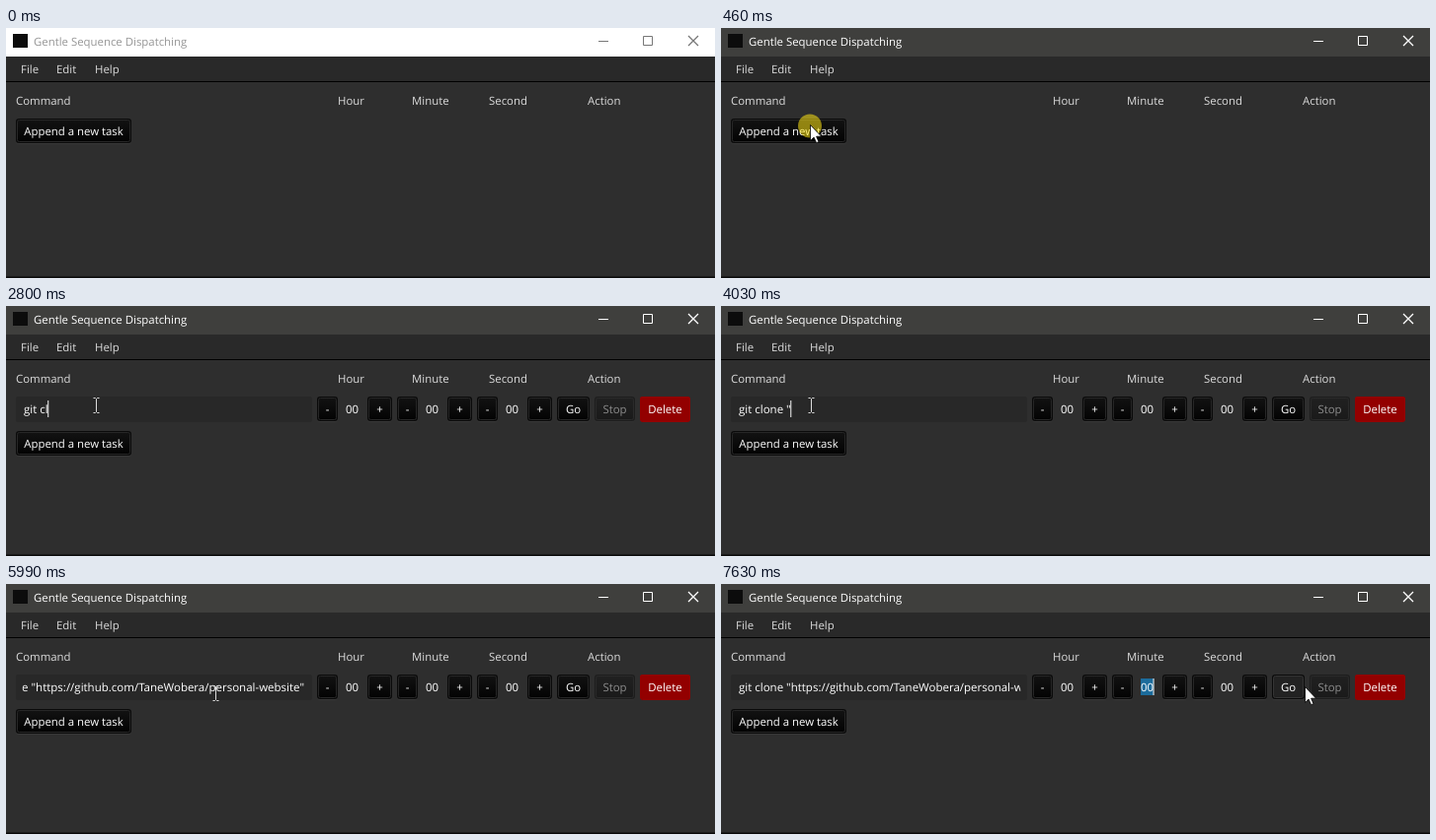
Recreate the animation shown at these times as an HTML page. Size 718 by 254 pixels, loop 8 s.

```html
<!DOCTYPE html>
<html lang="en">
<head>
<meta charset="utf-8">
<title>Gentle Sequence Dispatching</title>
<style>
html, body { margin: 0; width: 100%; height: 100%; overflow: hidden; background: #2e2e2e; }
svg { display: block; width: 718px; height: 254px; }
text {
  font: 11.4px "Open Sans", "Noto Sans", sans-serif;
  text-rendering: geometricPrecision;
  white-space: pre;
  fill: #dcdcdc;
}
.mid { text-anchor: middle; }
.btn text, .num, #cmd { fill: #fff; }
#cmd { font-size: 11.5px; }
.btn .glow { fill: #383838; }
.btn .edge { fill: #0a0a0a; }
.btn .face { fill: url(#face); stroke: #262626; }
.btn.hover .face { fill: #222; stroke: #343434; }
.btn.off { opacity: .45; }
.btn.red rect { fill: #930000; stroke: none; }
#bar { fill: #fff; }
#name { fill: #969696; }
#ctl { fill: none; stroke: #777; }
.active #bar { fill: #3f3f3d; }
.active #name { fill: #fff; }
.active #ctl { stroke: #fff; }
</style>
</head>
<body>
<svg id="app" viewBox="0 0 718 254">
  <defs>
    <linearGradient id="face" x2="0" y2="1">
      <stop stop-color="#121212"/><stop offset="1" stop-color="#030303"/>
    </linearGradient>
    <clipPath id="clip"><rect x="16.5" y="92" width="286.7" height="26"/></clipPath>
  </defs>

  <rect width="718" height="254" fill="#2e2e2e"/>
  <rect id="bar" width="718" height="29"/>
  <rect x="7" y="6" width="15" height="14" fill="#0c0c0c"/>
  <text id="name" x="28" y="18">Gentle Sequence Dispatching</text>
  <g id="ctl">
    <path d="M600 13.5h10M645.5 8.5h9v9h-9z"/>
    <path d="M691 8l10 10M701 8l-10 10" stroke-width="1.3"/>
  </g>
  <rect y="29" width="718" height="25" fill="#292929"/>
  <rect y="54" width="718" height="1" fill="#000"/>
  <rect y="252.5" width="718" height="1.5" fill="#080808"/>
  <g id="labels"></g>

  <g id="row">
    <rect x="10" y="92" width="300" height="26" rx="2" fill="#282828"/>
    <g clip-path="url(#clip)"><text id="cmd" y="109"></text></g>
    <rect id="sel" x="425" y="96" width="13" height="17" fill="#1c6c9c"/>
  </g>
  <g id="append"></g>
  <rect id="caret" y="96" width="1.1" height="17" fill="#e4e4e4"/>

  <circle id="press" r="12" fill="#ffe614" fill-opacity=".55"/>
  <g id="pointer">
    <path id="arrow" d="M.5 .5V16.5L4.1 13.1 6.6 18.7 9 17.7 6.6 12.2H11.6Z" fill="#fff" stroke="#000" stroke-width=".8"/>
    <path id="beam" d="M-2.5-7.5H-.5L.5-6.5 1.5-7.5H3.5M.5-6.5V6.5M-2.5 7.5H-.5L.5 6.5 1.5 7.5H3.5" fill="none" stroke="#dcdcdc"/>
  </g>
</svg>
<script>
const LOOP = 8000;
const ACTIVATE = 460, ADD_ROW = 540, LEAVE_FIELD = 6780, DRAG = 7250, SELECT = 7330;
const $ = id => document.getElementById(id);

function el(parent, tag, attrs, text) {
  const node = document.createElementNS('http://www.w3.org/2000/svg', tag);
  for (const key in attrs) node.setAttribute(key, attrs[key]);
  if (text) node.textContent = text;
  parent.append(node);
  return node;
}

const buttons = [];
function button(parent, x, w, label, kind = '') {
  const g = el(parent, 'g', { class: 'btn ' + kind });
  el(g, 'rect', { class: 'glow', x, y: 92, width: w, height: 26, rx: 3 });
  el(g, 'rect', { class: 'edge', x, y: 92, width: w, height: 25, rx: 3 });
  el(g, 'rect', { class: 'face', x: x + 1.5, y: 93.5, width: w - 3, height: 22, rx: 2 });
  el(g, 'text', { class: 'mid', x: x + w / 2, y: 109 }, label);
  if (!kind) buttons.push({ g, x, w, inRow: parent === $('row') });
}

const labels = [
  [15, 46, 'File'], [51, 46, 'Edit'], [90, 46, 'Help'],
  [10, 78, 'Command'], [336, 78, 'Hour'], [411, 78, 'Minute'],
  [489, 78, 'Second'], [589, 78, 'Action']
];
for (const [x, y, s] of labels) el($('labels'), 'text', { x, y }, s);

for (const x of [315, 396, 477]) {
  button($('row'), x, 21, '-');
  el($('row'), 'text', { class: 'num mid', x: x + 35.5, y: 109 }, '00');
  button($('row'), x + 51, 25, '+');
}
button($('row'), 558, 33, 'Go');
button($('row'), 596, 41, 'Stop', 'off');
button($('row'), 642, 51, 'Delete', 'red');
button($('append'), 10, 117, 'Append a new task');

const url = 'https://github.com/TaneWobera/personal-website';
const typing = [
  [0, ''], [1630, 'g'], [1710, 'gi'], [1790, 'git'], [1950, 'git '],
  [2180, 'git l'], [2640, 'git '], [2720, 'git c'], [2800, 'git cl'],
  [3270, 'git clo'], [3350, 'git clon'], [3420, 'git clone'],
  [3730, 'git clone '], [4030, 'git clone "'],
  [4270, 'git clone "' + url], [5290, 'git clone "' + url + '"']
];

// time, x, y, shape
const moves = [
  [70, 150, 203, 'arrow'], [150, 134, 168, 'arrow'], [230, 116, 136, 'arrow'],
  [310, 102, 114, 'arrow'], [390, 92, 101, 'arrow'], [460, 90, 98, 'arrow'],
  [540, 91, 100, 'beam'], [700, 91, 101, 'beam'],
  [5840, 128, 106, 'beam'], [5920, 212, 111, 'beam'], [6000, 312, 114, 'arrow'],
  [6070, 376, 115, 'arrow'], [6230, 410, 117, 'arrow'], [6310, 439, 119, 'arrow'],
  [6390, 443, 112, 'beam'], [6460, 440, 109, 'beam'], [6540, 438, 107, 'beam'],
  [6620, 436, 106, 'beam'], [6940, 440, 105, 'beam'], [7020, 442, 104, 'beam'],
  [7090, 439, 104, 'beam'], [7250, 424, 102, 'beam'], [7330, 441, 102, 'beam'],
  [7410, 478, 103, 'arrow'], [7480, 532, 104, 'arrow'], [7560, 577, 104, 'arrow'],
  [7630, 591, 104, 'arrow']
];
const presses = [[460, 540], [850, 930], [7250, 7410]];
const pressShift = { arrow: [0, 1.5], beam: [-1.5, -0.5] };
const caretOn = [[850, 1400], [1630, 4820], [4980, 5840], [6390, LOOP]];

const last = (steps, t) => steps.findLast(s => s[0] <= t);
const within = (spans, t) => spans.some(([a, b]) => t >= a && t < b);
const show = (id, on) => $(id).setAttribute('visibility', on ? 'visible' : 'hidden');

function drawField(t) {
  const cmd = $('cmd');
  const value = last(typing, t)[1];
  if (cmd.textContent !== value) cmd.textContent = value;
  let x = 17.5 + (value ? cmd.getComputedTextLength() : 0);
  const scroll = t < LEAVE_FIELD ? Math.max(0, x - 301.5) : 0;
  cmd.setAttribute('x', 18 - scroll);
  x -= scroll;
  if (t >= LEAVE_FIELD) x = t < DRAG ? 430.9 : t < SELECT ? 424.5 : 437.5;
  $('caret').setAttribute('x', x);
  show('caret', within(caretOn, t));
  show('sel', t >= SELECT);
}

function drawPointer(t) {
  const [, x, y, shape] = last(moves, t) || [0, -50, -50, 'arrow'];
  const [dx, dy] = pressShift[shape];
  const pressed = within(presses, t);
  show('arrow', shape === 'arrow');
  show('beam', shape === 'beam');
  show('press', pressed);
  $('pointer').setAttribute('transform', `translate(${x} ${y})`);
  $('press').setAttribute('cx', x + dx);
  $('press').setAttribute('cy', y + dy);
  for (const b of buttons) {
    const top = !b.inRow && t >= ADD_ROW ? 127 : 92;
    const hover = !pressed && x >= b.x && x <= b.x + b.w && y >= top && y < top + 26;
    b.g.classList.toggle('hover', hover);
  }
}

function draw(t) {
  const added = t >= ADD_ROW;
  $('app').classList.toggle('active', t >= ACTIVATE);
  $('row').setAttribute('display', added ? 'inline' : 'none');
  $('append').setAttribute('transform', `translate(0 ${added ? 35 : 0})`);
  if (added) drawField(t); else show('caret', false);
  show('sel', t >= SELECT);
  drawPointer(t);
}

function frame() {
  draw(performance.now() % LOOP);
  requestAnimationFrame(frame);
}
frame();
</script>
</body>
</html>
```
